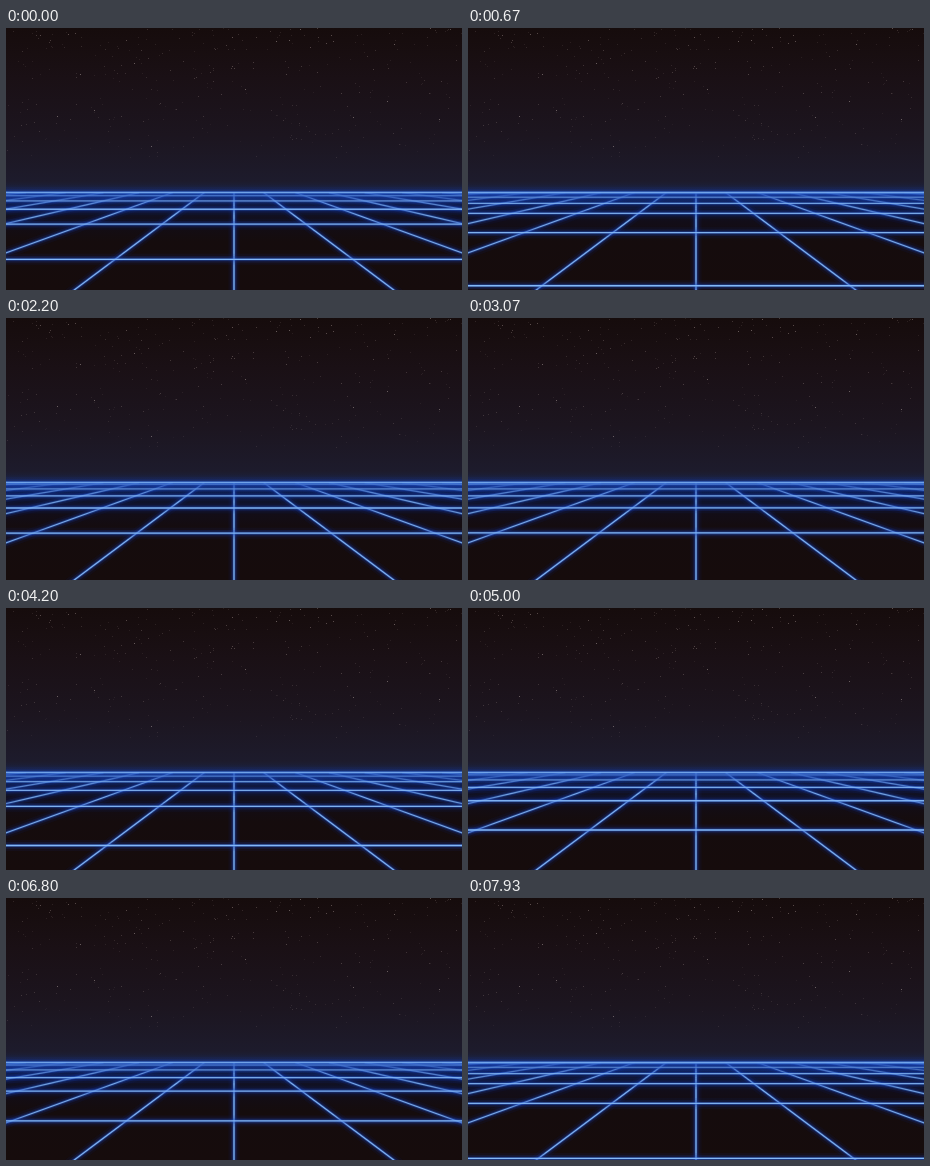
An HTML page with a canvas for the animation above (8000 ms loop, 456 px wide and 262 px high).

```html
<!DOCTYPE html>
<html lang="en">
<head>
<meta charset="utf-8">
<title>Neon grid</title>
<style>
  html, body { margin: 0; width: 100%; height: 100%; overflow: hidden; background: #150c0c; }
  canvas { display: block; width: 100%; height: 100%; }
</style>
</head>
<body>
<canvas id="stage" width="456" height="262"></canvas>
<script>
const W = 456, H = 262, CENTER = W / 2, HORIZON = 164.5;
const LOOP = 8000, FPS = 15;
const ctx = document.getElementById('stage').getContext('2d');

// Steady flight over the floor: [step, cells travelled]
const FLIGHT = [[0, 0], [21, 2.825], [46, 6.655], [75, 10.822], [120, 17.52]];

function travelled(step) {
  const i = FLIGHT.findIndex(key => key[0] > step);
  const [t0, c0] = FLIGHT[i - 1], [t1, c1] = FLIGHT[i];
  return c0 + (c1 - c0) * (step - t0) / (t1 - t0);
}

function layer(draw) {
  const c = document.createElement('canvas');
  c.width = W;
  c.height = H;
  draw(c.getContext('2d'));
  return c;
}

function fade(g, top, bottom, stops) {
  const paint = g.createLinearGradient(0, top, 0, bottom);
  stops.forEach(([at, color]) => paint.addColorStop(at, color));
  g.fillStyle = paint;
  g.fillRect(0, top, W, bottom - top);
}

function glowLine(g, x0, y0, x1, y1, strength = 1) {
  const passes = [
    [11, 'rgba(20,45,140,.10)'], [6.5, 'rgba(22,60,180,.20)'],
    [3, 'rgba(40,95,215,.42)'], [1.3, 'rgb(132,184,246)']
  ];
  g.globalAlpha = strength;
  for (const [width, color] of passes) {
    g.lineWidth = width;
    g.strokeStyle = color;
    g.beginPath();
    g.moveTo(x0, y0);
    g.lineTo(x1, y1);
    g.stroke();
  }
  g.globalAlpha = 1;
}

function random(seed) {
  return () => (seed = seed * 16807 % 2147483647) / 2147483647;
}

const backdrop = layer(g => {
  fade(g, 0, HORIZON, [[0, '#160c0c'], [0.3, '#1a1015'], [0.65, '#1c151f'], [0.93, '#1d1b2c'], [1, '#1b2342']]);
  fade(g, HORIZON, H, [[0, '#10204c'], [0.12, '#0f1632'], [0.3, '#120d18'], [0.5, '#150c0d'], [1, '#160c0c']]);
  const next = random(4711);
  for (let i = 0; i < 320; i++) {
    const x = next() * W, y = 130 * next() ** 1.4;
    g.fillStyle = `rgba(190,170,165,${(0.12 + 0.33 * next() ** 2) * (1 - y / 200)})`;
    g.fillRect(Math.floor(x), Math.floor(y), 1, 1);
  }
  const bright = [[388, 16], [283, 12], [270, 13], [128, 35], [239, 61], [88, 82], [381, 73],
    [347, 89], [433, 91], [51, 88], [145, 118], [74, 46]];
  g.fillStyle = 'rgba(200,185,180,.45)';
  bright.forEach(([x, y]) => g.fillRect(x, y, 1, 1));
});

const rails = layer(g => {
  g.beginPath();
  g.rect(0, HORIZON, W, H);
  g.clip();
  const vanish = 142.3;
  for (let n = -8; n <= 8; n++) {
    const a = Math.abs(n);
    const slope = 1.335 * n * (1 + 0.034 * Math.max(0, a - 1));
    const x = y => CENTER + slope * (y - vanish);
    glowLine(g, x(HORIZON), HORIZON, x(H + 4), H + 4, 1 - 0.06 * a);
  }
});

const horizonGlow = layer(g => {
  fade(g, 156, 175, [[0, 'rgba(25,60,150,0)'], [0.3, 'rgba(25,60,150,.18)'],
    [0.46, 'rgba(35,90,190,.5)'], [1, 'rgba(20,50,130,0)']]);
  glowLine(g, 0, HORIZON, W, HORIZON, 0.8);
});

function render(ms) {
  const step = Math.floor((ms + 4) * FPS / 1000) % (LOOP * FPS / 1000);
  const offset = 0.487 - travelled(step);
  const phase = offset - Math.floor(offset);
  ctx.drawImage(backdrop, 0, 0);
  ctx.drawImage(rails, 0, 0);
  ctx.save();
  ctx.beginPath();
  ctx.rect(0, HORIZON, W, H);
  ctx.clip();
  for (let row = 0; row < 6; row++) {
    const depth = 1 + phase + row;
    const y = 144 + 1 / (0.0077 * depth);
    if (y > HORIZON) glowLine(ctx, 0, y, W, y, 1 - 0.06 * row);
  }
  ctx.restore();
  ctx.drawImage(horizonGlow, 0, 0);
}

const start = performance.now();
function tick() {
  render((performance.now() - start) % LOOP);
  requestAnimationFrame(tick);
}
render(0);
requestAnimationFrame(tick);
</script>
</body>
</html>
```
